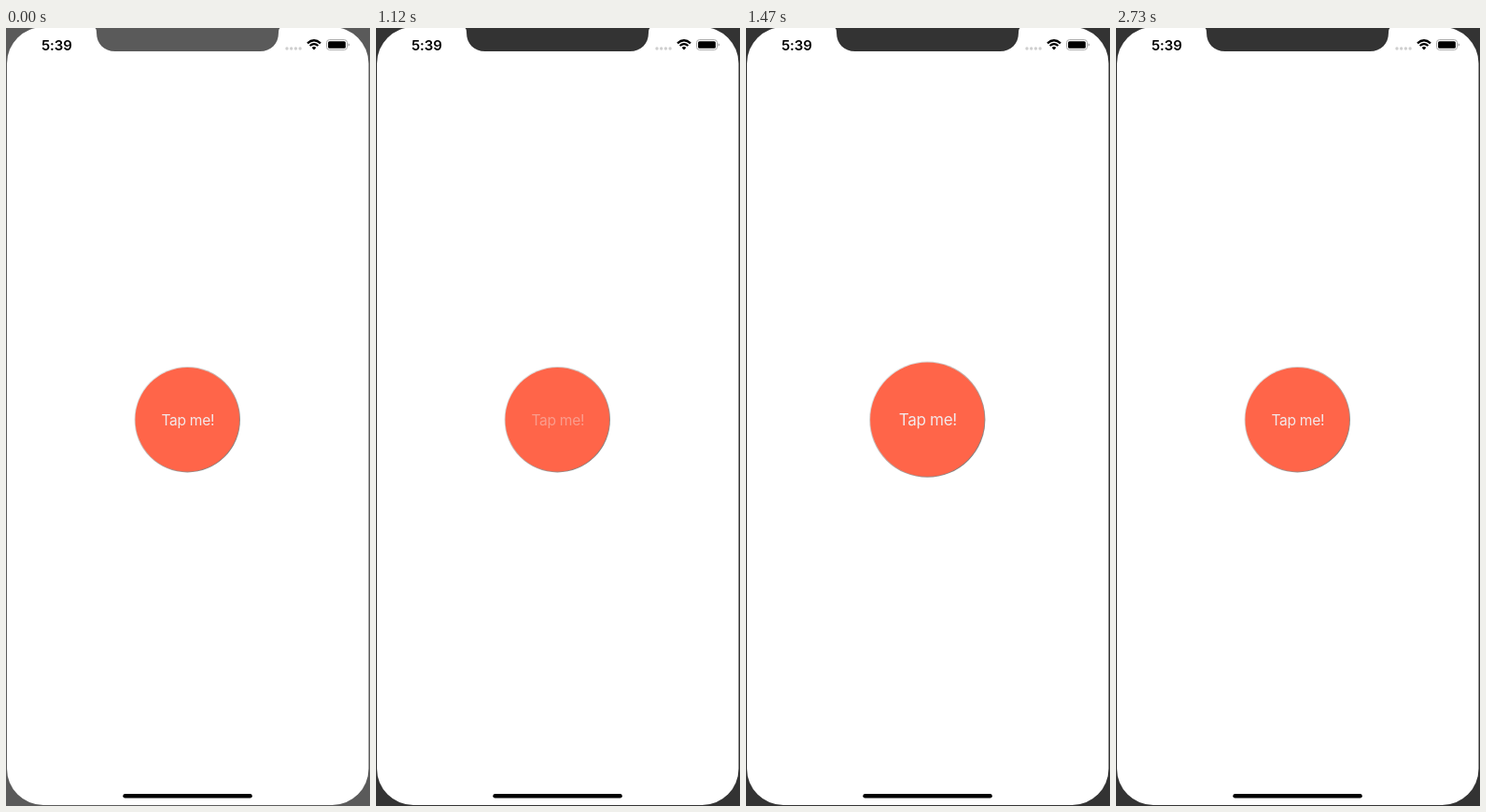
These frames come from a looping animation (390x834 px, 3080 ms). An HTML page:

```html
<!DOCTYPE html>
<html lang="en">
<head>
<meta charset="utf-8">
<title>Tap button</title>
<style>
  html, body { margin: 0; width: 100%; height: 100%; overflow: hidden; background: #fff; }
  svg { display: block; width: 100vw; height: 100vh; }
  text { font-family: Inter, "Liberation Sans", sans-serif; }
</style>
</head>
<body>
<svg viewBox="0 0 390 834">
  <defs>
    <linearGradient id="rim" x1="0.15" y1="0.15" x2="0.85" y2="0.85">
      <stop offset="0" stop-color="#dedede"/>
      <stop offset="0.5" stop-color="#c0a8a2"/>
      <stop offset="1" stop-color="#84807e"/>
    </linearGradient>
  </defs>

  <g id="bezel">
    <rect width="390" height="834"/>
    <rect x="1" y="-1" width="387.5" height="834" rx="39" fill="#fff"/>
    <path d="M95.5 0 Q97 1 97 5 C97 17 105 25 117 25 H272 C284 25 292 17 292 5 Q292 1 293.5 0 Z"/>
  </g>

  <text x="38" y="23.5" font-size="15" font-weight="600" letter-spacing="-0.1">5:39</text>
  <g fill="#cfcfcf">
    <circle cx="301" cy="22" r="1.7"/>
    <circle cx="305.7" cy="22" r="1.7"/>
    <circle cx="310.4" cy="22" r="1.7"/>
    <circle cx="315.1" cy="22" r="1.7"/>
  </g>
  <g fill="none" stroke="#000" stroke-width="2.2">
    <path d="M323 16.3 Q330 10.2 337 16.3"/>
    <path d="M325.6 19 Q330 15.2 334.4 19"/>
  </g>
  <path d="M327.6 21 Q330 19.2 332.4 21 L330 23.6 Z"/>
  <rect x="343.5" y="12.6" width="22" height="10.8" rx="3" fill="none" stroke="#a8a8a8"/>
  <rect x="345.1" y="14.2" width="18.8" height="7.6" rx="1.6"/>
  <path d="M366.6 16.2 Q368.2 16.8 368.2 18 Q368.2 19.2 366.6 19.8 Z" fill="#a8a8a8"/>
  <rect x="125.3" y="821" width="138.5" height="4.6" rx="2.3"/>

  <g id="button">
    <circle r="56.7" fill="url(#rim)"/>
    <circle r="55.8" fill="#ff6549"/>
    <text id="label" x="0.5" y="6" font-size="15.6" letter-spacing="-0.3" text-anchor="middle" fill="#f3e9ea">Tap me!</text>
  </g>
</svg>
<script>
  const LOOP = 3080, STEP = 70;
  const PRESS = 1120, GROWN = 1260, RELEASE = 1470, RESTED = 1680;
  const byId = id => document.getElementById(id);
  const bezel = byId("bezel"), button = byId("button"), label = byId("label");

  const progress = (t, a, b) => Math.min(1, Math.max(0, (t - a) / (b - a)));
  const ease = p => p * p * (3 - 2 * p);

  function draw(ms) {
    const t = Math.floor((ms % LOOP) / STEP) * STEP;
    const grow = ease(progress(t, PRESS, GROWN)) - ease(progress(t, RELEASE, RESTED));
    const alpha = t < PRESS ? 1 : 0.42 + 0.58 * progress(t, PRESS, GROWN);
    bezel.setAttribute("fill", t < PRESS ? "#5a5a5a" : "#333");
    button.setAttribute("transform", `translate(194.3 419.7) scale(${1 + 0.096 * grow})`);
    label.setAttribute("opacity", alpha);
  }

  const start = performance.now();
  function tick() {
    draw(performance.now() - start);
    requestAnimationFrame(tick);
  }
  tick();
</script>
</body>
</html>
```
